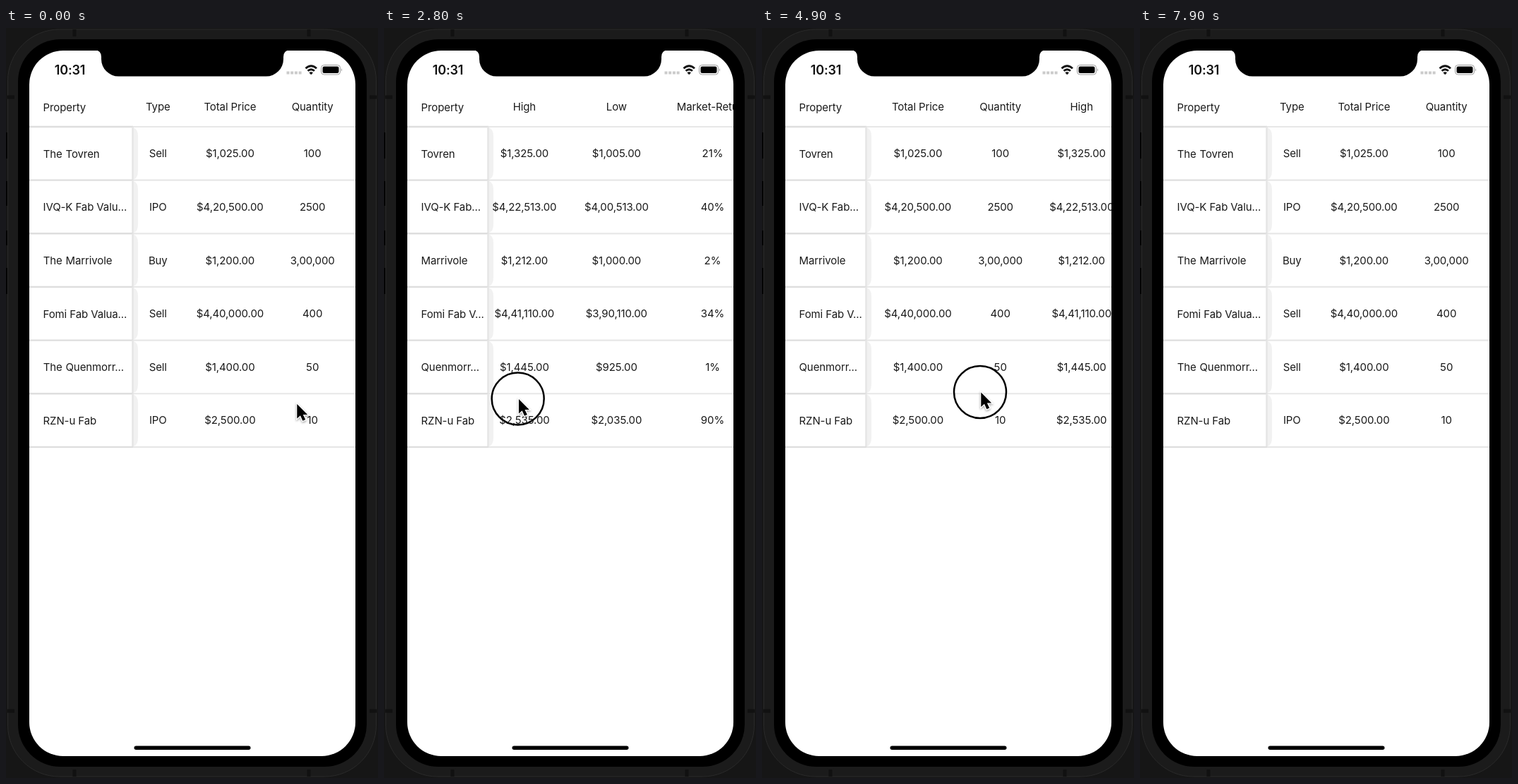
An HTML page that plays this animation: 527x1063 px, repeating every 8 s.

```html
<!DOCTYPE html>
<html lang="en">
<head>
<meta charset="utf-8">
<title>Collapsing table column</title>
<style>
  html, body { margin: 0; width: 100%; height: 100%; overflow: hidden; background: #161616; }
  svg { display: block; width: 100%; height: 100%; }
  text { font: 15px Inter, "Liberation Sans", sans-serif; letter-spacing: -.1px; fill: #1a1a1a; white-space: pre; }
  .mid { text-anchor: middle; }
  .clock { font-size: 18px; font-weight: 600; letter-spacing: -.2px; fill: #111; }
</style>
</head>
<body>
<svg viewBox="0 0 527 1063">
  <defs>
    <clipPath id="screen"><rect x="33" y="32" width="462" height="1000"/></clipPath>
    <filter id="soft" x="-50%" y="-50%" width="200%" height="200%">
      <feDropShadow dx="0" dy="1.5" stdDeviation="1.5" flood-opacity=".4"/>
    </filter>
  </defs>

  <!-- phone body -->
  <rect width="527" height="1063" fill="#161616"/>
  <path d="M1 148V185M1 217V252M1 287V308M1 340V377" stroke="#000" stroke-width="2"/>
  <rect x="2.5" y="2" width="522" height="1059" rx="73" fill="#1b1b1b" stroke="#2a2a2a"/>
  <path d="M97 2V12M429 2V12M97 1051V1061M429 1051V1061M2 98H12M2 968H12M515 98H525M515 968H525" stroke="#111" stroke-width="5"/>
  <rect x="17" y="16" width="494" height="1031" rx="60"/>
  <rect x="33" y="32" width="462" height="1000" rx="48" fill="#fff"/>
  <path d="M126 31Q135 32 135 41V44A24.500 24.500 0 0 0 159.500 68.500H368.500A24.500 24.500 0 0 0 393 44V41Q393 32 402 31Z"/>
  <rect x="181.500" y="1017.500" width="165" height="5.500" rx="2.750"/>

  <!-- status bar -->
  <text class="clock mid" x="90.500" y="66">10:31</text>
  <path d="M397.500 63.500H419" stroke="#cbcbcb" stroke-width="4" stroke-dasharray="4 1.700"/>
  <g fill="none" stroke="#111" stroke-width="2.800">
    <path d="M424.500 57.300Q432.200 50.300 440 57.300"/>
    <path d="M427.500 60.800Q432.200 56.600 437 60.800"/>
  </g>
  <path d="M432.200 66.300L429.400 63.300Q432.200 61 435 63.300Z" fill="#111"/>
  <rect x="446.500" y="52.500" width="27" height="13.500" rx="4" fill="none" stroke="#9a9a9a"/>
  <rect x="448.500" y="54.500" width="23" height="9.500" rx="2.300" fill="#000"/>
  <path d="M475 57Q477 59.300 475 61.500Z" fill="#9a9a9a"/>

  <g clip-path="url(#screen)">
    <g id="lines" stroke="#e7e7e7" stroke-width="2.200"></g>
    <g id="cells"></g>
    <g id="panel">
      <rect x="-150" y="92" width="330" height="503" fill="#fff"/>
    </g>
    <g id="names"></g>
  </g>

  <circle id="touch" r="37" fill="none" stroke="#000" stroke-width="2.500"/>
  <g id="cursor" filter="url(#soft)">
    <path transform="translate(.8 2.500) scale(.85)" d="M0 0V24L5.500 19L9.500 28L14 26L10 17.500H17.500Z" stroke="#fff" stroke-width="2.800" paint-order="stroke"/>
  </g>
</svg>

<script>
const $ = id => document.getElementById(id);
const LOOP = 8000, STEP = 100;
const COLLAPSE = 32, LEFT = 52.5, GAP = 36.3, VIEW_RIGHT = 476;
const TOP = 140, ROW = 75.65;

function add(parent, tag, attrs, content = '') {
  const el = document.createElementNS('http://www.w3.org/2000/svg', tag);
  for (const key in attrs) el.setAttribute(key, attrs[key]);
  el.textContent = content;
  return parent.appendChild(el);
}

const columns = [
  { width: 34.6, cells: 'Type|Sell|IPO|Buy|Sell|Sell|IPO' },
  { width: 97, cells: 'Total Price|$1,025.00|$4,20,500.00|$1,200.00|$4,40,000.00|$1,400.00|$2,500.00' },
  { width: 64, cells: 'Quantity|100|2500|3,00,000|400|50|10' },
  { width: 93.4, cells: 'High|$1,325.00|$4,22,513.00|$1,212.00|$4,41,110.00|$1,445.00|$2,535.00' },
  { width: 95, cells: 'Low|$1,005.00|$4,00,513.00|$1,000.00|$3,90,110.00|$925.00|$2,035.00' },
  { width: 104.5, cells: 'Market-Return|21%|40%|2%|34%|1%|90%' },
  { width: 55, cells: 'Status|Active|Inactive|Active|Active|Inactive|Inactive' }
];

// article: shrinks away; room: characters that fit while the column is wide
const properties = [
  { name: 'Tovren', article: true },
  { name: 'IVQ-K Fab Valuation', room: 14.3 },
  { name: 'Marrivole', article: true },
  { name: 'Fomi Fab Valuation', room: 14.9 },
  { name: 'Quenmorrill', article: true, short: 'Quenmorr...' },
  { name: 'RZN-u Fab' }
];

const baseline = row => row ? 183.2 + (row - 1) * ROW : 117.3;

let right = 198 - GAP;
for (const { width, cells } of columns) {
  const x = right + GAP + width / 2;
  cells.split('|').forEach((value, row) =>
    add($('cells'), 'text', { class: 'mid', x, y: baseline(row) }, value));
  right = x + width / 2;
}
const MAX = right - VIEW_RIGHT;

for (let i = 0; i <= properties.length; i++) {
  const y = TOP + i * ROW;
  add($('lines'), 'path', { d: `M33 ${y}H495` });
  add($('panel'), 'path', { d: `M-150 ${y}H180`, stroke: '#dedede', 'stroke-width': 2.4 });
  if (i === properties.length) break;
  add($('panel'), 'path', {
    d: `M180 ${y + 1}q7 2 7 12v49q0 10 -5 12h-2z`,
    fill: '#000', 'fill-opacity': .055
  });
  add($('panel'), 'path', { d: `M179.5 ${y}v${ROW}`, stroke: '#e6e6e6', 'stroke-width': 2.6 });
}

add($('names'), 'text', { x: LEFT, y: baseline(0) + .4 }, 'Property');
properties.forEach((p, i) => {
  const y = baseline(i + 1) + .4;
  if (p.article) p.the = add($('names'), 'text', { class: 'mid', y }, 'The');
  p.label = add($('names'), 'text', { y }, p.name);
});

// Each move glides the pointer to x, y; a move with an offset is a drag that scrolls there.
const home = { x: 411.5, y: 530.5, offset: 0 };
const moves = [
  { from: 500, to: 1000, x: 214.5, y: 531, offset: MAX },
  { from: 1800, to: 2400, x: 116, y: 526 },
  { from: 2500, to: 3300, x: 385.5, y: 517, offset: 0 },
  { from: 3700, to: 3800, x: 406, y: 516 },
  { from: 3800, to: 4900, x: 309.5, y: 514, offset: 96.5 },
  { from: 4900, to: 5500, x: 418.5, y: 521, offset: 0 },
  { from: 5850, to: 6300, x: 108.5, y: 477.5, offset: MAX },
  { from: 6850, to: 7600, x: 410, y: 492, offset: 0 }
];
const lastMove = moves[moves.length - 1];

const ease = p => p ** 3 * (10 - 15 * p + 6 * p * p);

function stateAt(t) {
  const state = { ...home, pressed: false };
  for (const move of moves) {
    if (t < move.from) break;
    const k = ease(Math.min(1, (t - move.from) / (move.to - move.from)));
    for (const key of ['x', 'y', 'offset'])
      if (key in move) state[key] += (move[key] - state[key]) * k;
    state.pressed = 'offset' in move && t < move.to;
  }
  return state;
}

function drawNames(shrink) {
  const left = 1 - shrink / COLLAPSE;
  const resting = left === 0 || left === 1;
  for (const p of properties) {
    p.label.setAttribute('x', p.article ? LEFT + COLLAPSE * left : LEFT);
    if (p.article) {
      p.the.setAttribute('transform', `translate(${LEFT + 13.7} 0) scale(${Math.max(left, .001)} 1)`);
      p.the.setAttribute('opacity', left);
      p.label.textContent = resting && p.short || p.name;
    } else if (p.room) {
      p.label.textContent = p.name.slice(0, Math.floor(p.room - shrink * .15)) + '...';
    }
  }
}

function place(id, x, y, visible = true) {
  $(id).setAttribute('transform', `translate(${x} ${y})`);
  $(id).style.display = visible ? '' : 'none';
}

function draw(t) {
  const { x, y, offset, pressed } = stateAt(t);
  const shrink = Math.min(offset, COLLAPSE);
  place('cells', -offset, 0);
  place('panel', -shrink, 0);
  place('cursor', x, y, t < lastMove.to);
  place('touch', x - .5, y + 2, pressed);
  drawNames(shrink);
}

const start = performance.now();
function tick() {
  const t = (performance.now() - start) % LOOP;
  draw(Math.floor(t / STEP) * STEP);
  requestAnimationFrame(tick);
}
tick();
</script>
</body>
</html>
```
